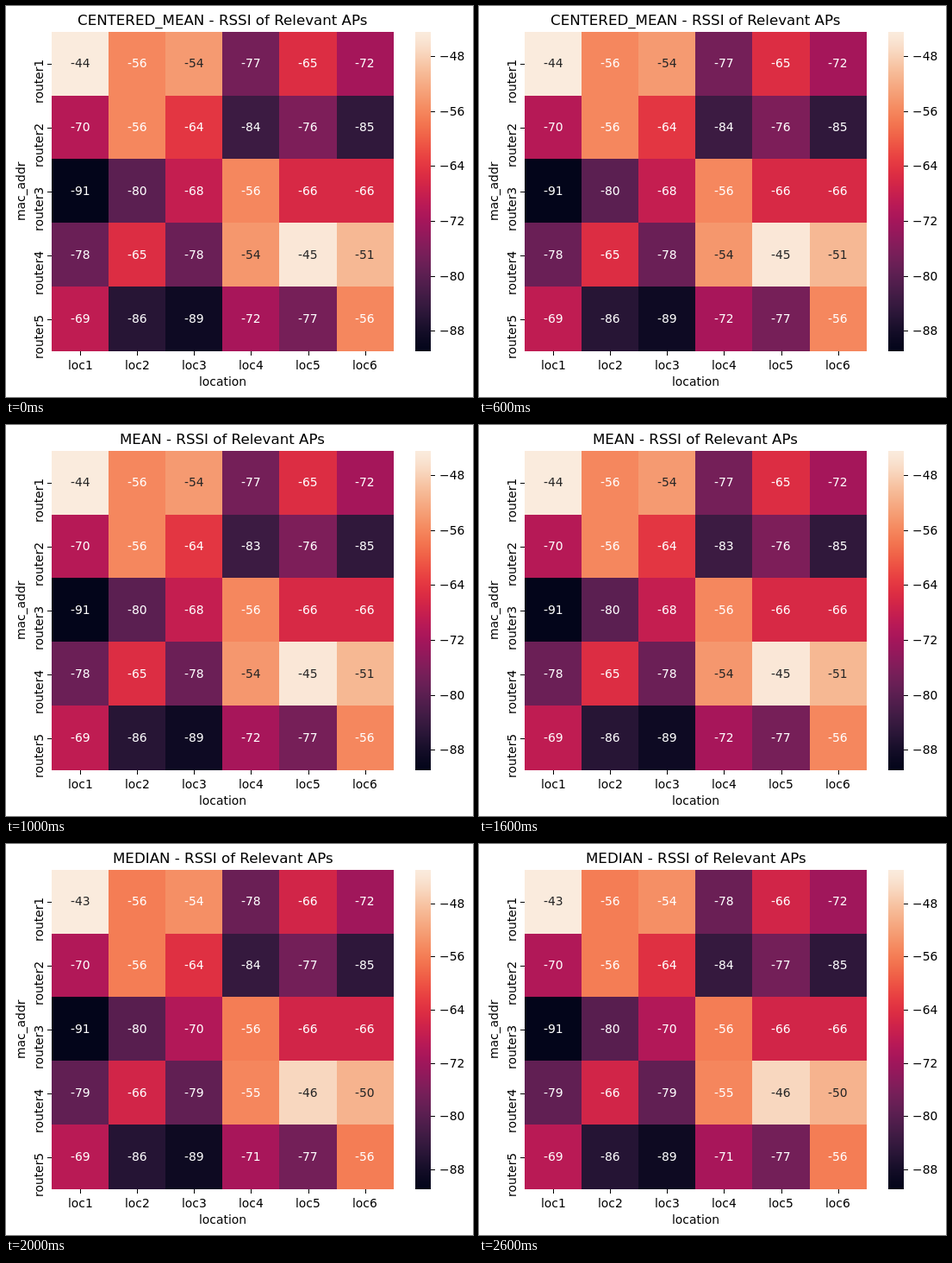
An HTML page with a canvas for the animation above (3 s loop, 542 by 453 pixels).

```html
<!DOCTYPE html>
<html>
<head>
<meta charset="utf-8">
<style>
  html, body { margin: 0; width: 100%; height: 100%; overflow: hidden; background: #fff; }
  canvas { display: block; }
</style>
</head>
<body>
<canvas id="stage" width="542" height="453"></canvas>
<script>
const ctx = document.getElementById('stage').getContext('2d');
const plot = { x: 53, y: 30, w: 396.8, h: 370 };
const bottom = plot.y + plot.h, middle = plot.x + plot.w / 2;

// Signal strengths in -dBm, one row per router
const readings = [
  '44 56 54 77 65 72',
  '70 56 64 83.2 76 85',
  '91 80 67.8 56 66 66',
  '78 65 78 54 45 51',
  '69 86 89 72 77 56'
].map(row => row.split(' ').map(Number));

// How far each reading leans away from its average, as digit - 1
const skew = ['011221', '111221', '113111', '222220', '111011'];

const weakest = 91;
const charts = [
  { name: 'CENTERED_MEAN', lean: 0.32, strongest: 44.48 },
  { name: 'MEAN', lean: 0.28, strongest: 44.48 },
  { name: 'MEDIAN', lean: 1, strongest: 43 }
];

const stops = ['03051a', '35193e', '701f57', 'ad1759', 'e13342', 'f37651', 'f6b48f', 'faebdd']
  .map(hex => hex.match(/../g).map(part => parseInt(part, 16)));

// Smooth curve through the colour stops, p from 0 (weak) to 1 (strong)
function ramp(p) {
  const last = stops.length - 1;
  const i = Math.min(last - 1, Math.floor(p * last)), t = p * last - i;
  const at = k => stops[Math.max(0, Math.min(last, k))];
  const rgb = [0, 1, 2].map(n => {
    const [a, b, c, d] = [-1, 0, 1, 2].map(k => at(i + k)[n]);
    return Math.round(b + t / 2 * (c - a + t * (2 * a - 5 * b + 4 * c - d + t * (3 * (b - c) + d - a))));
  });
  return `rgb(${rgb})`;
}

function rect(x, y, w, h, color = '#000') {
  ctx.fillStyle = color;
  ctx.fillRect(x, y, w, h);
}

function text(str, x, y, color = '#000', size = 13.889) {
  ctx.font = `${size}px "DejaVu Sans", sans-serif`;
  ctx.fillStyle = color;
  ctx.fillText(str, x, y);
}

// Centred text that starts on a whole pixel
function centred(str, x, y, color, size = 13.889) {
  ctx.font = `${size}px "DejaVu Sans", sans-serif`;
  text(str, Math.round(x - ctx.measureText(str).width / 2), y, color, size);
}

function vertical(write, str, x, y) {
  ctx.save();
  ctx.translate(x, y);
  ctx.rotate(-Math.PI / 2);
  write(str, 0, 0);
  ctx.restore();
}

function draw({ name, lean, strongest }) {
  const level = v => Math.min(1, (weakest - v) / (weakest - strongest));
  const columnEdge = c => Math.round(plot.x - 0.1 + c * plot.w / 6);
  const columnMiddle = c => plot.x + (c + 0.5) * plot.w / 6;

  rect(0, 0, 542, 453, '#fff');
  centred(name + ' - RSSI of Relevant APs', middle, 22, '#000', 16.667);

  readings.forEach((row, r) => {
    const y = Math.round(29.6 + r * 73.92), cy = plot.y + (r + 0.5) * plot.h / 5;
    row.forEach((reading, c) => {
      const v = reading + lean * (skew[r][c] - 1), x = columnEdge(c);
      rect(x, y, columnEdge(c + 1) - x, 75, ramp(level(v)));
      centred('-' + Math.round(v), columnMiddle(c), cy + 4, level(v) > 0.78 ? '#262626' : '#fff');
    });
    rect(48, cy, 5, 1);
    vertical(text, 'router' + (r + 1), 43, cy + 46);
  });

  for (let c = 0; c < 6; c++) {
    rect(Math.round(columnMiddle(c)), bottom, 1, 5);
    centred('loc' + (c + 1), columnMiddle(c), 421);
  }
  centred('location', middle, 440);
  vertical(centred, 'mac_addr', 22, plot.y + plot.h / 2);

  for (let y = plot.y; y < bottom; y++) rect(475, y, 18, 1, ramp((bottom - y - 0.5) / plot.h));
  for (let v = 48; v <= 88; v += 8) {
    const y = Math.round(bottom - plot.h * level(v));
    rect(493, y, 5, 1);
    text('\u2212' + v, 503, y + 5);
  }
}

function frame() {
  draw(charts[Math.floor(performance.now() % 3000 / 1000)]);
  requestAnimationFrame(frame);
}
frame();
</script>
</body>
</html>
```
